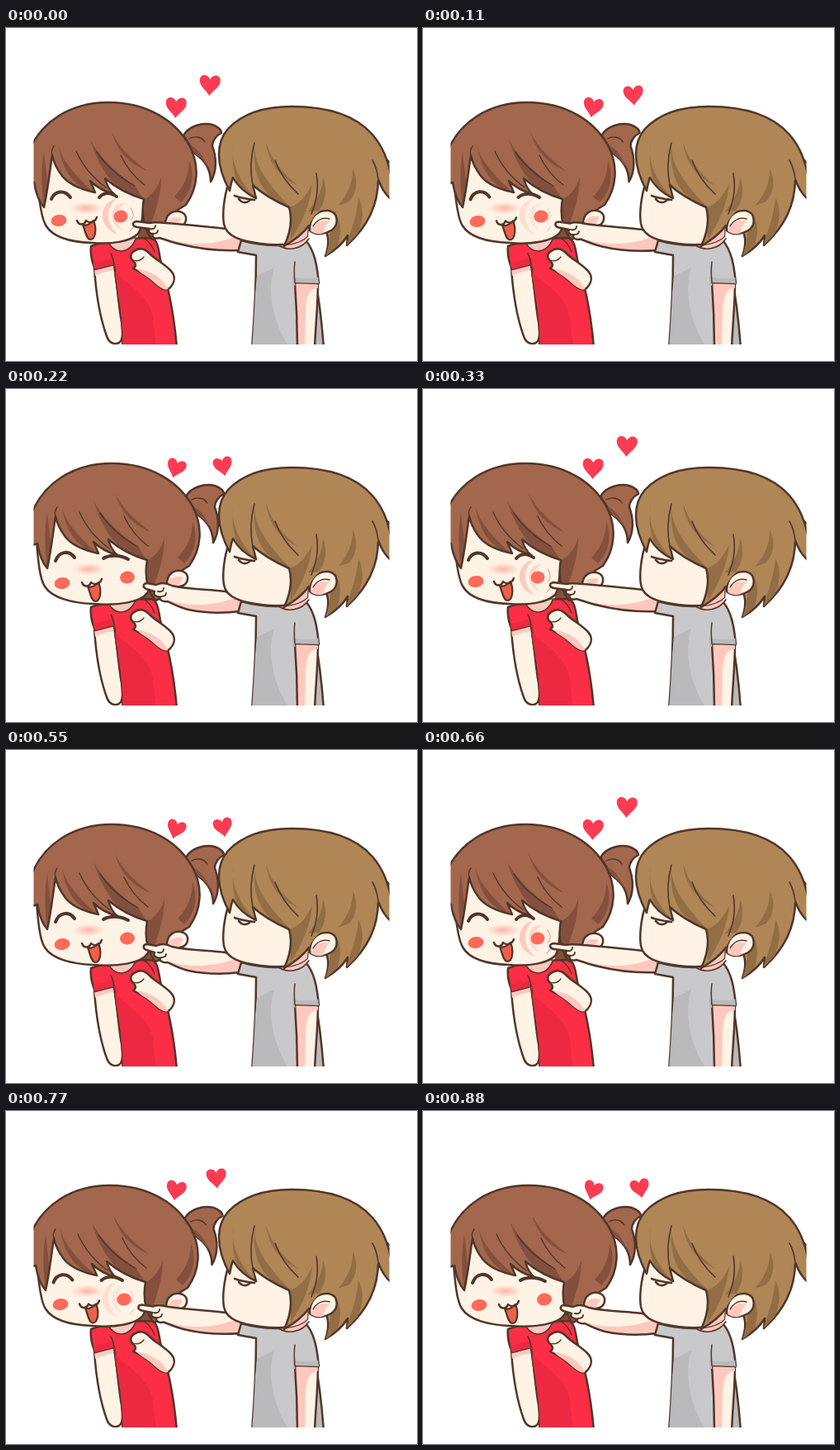
These frames come from a looping animation (498x403 px, 990 ms). An HTML page with a canvas:

```html
<!DOCTYPE html>
<html lang="en">
<head>
<meta charset="utf-8">
<title>Cheek poke</title>
<style>
html, body { margin: 0; width: 100%; height: 100%; overflow: hidden; background: #fff; }
canvas { display: block; width: 498px; height: 403px; }
</style>
</head>
<body>
<canvas id="stage" width="498" height="403"></canvas>
<script>
const ctx = document.getElementById('stage').getContext('2d');
const STEP = 110, CYCLE = 3;
const C = {
  line: '#513629', skin: '#fff3e5', pink: '#ffc8bf', cheek: '#ff6a5c', heart: '#fb3c53',
  girl: '#a2674d', girlDark: '#84503d', boy: '#b08657', boyDark: '#926d45',
  red: '#fc2e45', redDark: '#ec2940', grey: '#c9c8ca', greyDark: '#bab9bc'
};

// Blend two paths that share the same commands.
function mix(a, b, p) {
  const to = b.match(/-?[\d.]+/g);
  let i = 0;
  return a.replace(/-?[\d.]+/g, n => +n + (to[i++] - n) * p);
}
const lerp = (a, b, p) => a + (b - a) * p;

function shape(d, fill, stroke, width = 2.5) {
  const path = new Path2D(d);
  if (fill) { ctx.fillStyle = fill; ctx.fill(path); }
  if (stroke) { ctx.strokeStyle = stroke; ctx.lineWidth = width; ctx.stroke(path); }
}

function inside(d, draw) {
  ctx.save();
  ctx.clip(new Path2D(d));
  draw();
  ctx.restore();
}

function oval(x, y, rx, ry, fill, turn = 0) {
  ctx.beginPath();
  ctx.ellipse(x, y, rx, ry, turn, 0, 7);
  ctx.fillStyle = fill;
  ctx.fill();
}

function shifted(x, y, draw) {
  ctx.save();
  ctx.translate(x, y);
  draw();
  ctx.restore();
}

function heart(x, y, size, turn) {
  ctx.save();
  ctx.translate(x, y);
  ctx.rotate(turn);
  ctx.scale(size / 24, size / 24);
  shape('M0 13C-4 6 -12 3 -12 -5C-12 -12 -3 -13 0 -6C3 -13 12 -12 12 -5C12 3 4 6 0 13Z', C.heart);
  ctx.restore();
}

function ponytail(p) {
  shifted(3 * p, 0, () => {
    const d = 'M215 130C221 119 237 114 250 117C256 119 261 123 261 127C255 130 250 136 250 143C255 156 256 173 248 186C248 173 242 161 229 152Z';
    shape(d, C.girl, C.line);
    inside(d, () => shape('M216 140C232 142 244 157 248 186L240 180L226 156Z', C.girlDark));
    shape('M222 134C230 130 237 132 241 138', null, C.line, 1.3);
  });
}

function girlBody() {
  shape('M160 235L190 236C183 250 181 256 178 263L160 264Z', C.girlDark);
  const arm = 'M107 290C109 322 113 348 122 373C125 382 134 385 139 379C143 372 141 360 139 350C136 330 134 306 131 285Z';
  shape(arm, C.skin, C.line);
  inside(arm, () => shape('M106 291L132 285L133 293C124 293 114 297 108 300Z', C.pink));
  const shirt = 'M103 264C124 256 156 254 177 254C184 257 185 269 187 280C195 309 203 339 207 387L141 387C143 352 135 323 131 286L108 292C104 283 102 273 103 264Z';
  shape(shirt, C.red, C.line);
  inside(shirt, () => {
    shape('M130 292C145 310 172 320 178 350L182 387L140 387Z', C.redDark);
    shape('M106 284L132 278L132 289L106 296Z', C.redDark);
    shape('M122 254C126 266 133 270 140 270C149 269 155 262 158 253Z', C.pink, C.line, 1.6);
  });
  shape('M131 286C130 280 129 276 127 273', null, C.line, 1.6);
  shape('M166 254C172 257 177 263 180 271', null, C.line, 1.4);
  const hand = 'M154 291C159 288 157 284 153 281C149 276 152 271 157 269C163 265 169 268 174 273C181 280 191 285 199 293C206 300 205 308 198 315C192 320 183 311 176 305C169 299 160 294 154 291Z';
  shape(hand, C.skin, C.line);
  inside(hand, () => shape('M158 291C177 294 191 304 197 317L188 319L168 301Z', C.pink));
  shape('M154 281C160 283 164 281 167 277', null, C.line, 1.3);
}

function girlHead(p) {
  const face = mix(
    'M38 184C40 209 43 232 49 240C57 253 78 259 104 260C130 262 151 258 160 249C165 243 165 227 168 200L110 145L50 155Z',
    'M37 184C39 209 41 230 47 239C56 253 80 259 105 260C138 263 164 257 171 247C177 239 175 222 174 200L114 145L54 155Z', p);
  shape(face, C.skin, C.line);

  const g = ctx.createRadialGradient(0, 0, 0, 0, 0, 20);
  g.addColorStop(0, 'rgba(255,142,132,.65)');
  g.addColorStop(1, 'rgba(255,160,145,0)');
  ctx.save();
  ctx.translate(lerp(97, 100, p), 218);
  ctx.scale(1, .38);
  oval(0, 0, 20, 20, g);
  ctx.restore();

  // Dent under the fingertip.
  ctx.globalAlpha = 1 - p;
  shape('M133 207C112 211 110 242 136 250C121 238 120 220 133 207Z', '#ffcabf');
  shape('M144 212C124 211 123 239 142 245C131 236 131 220 144 212Z', '#ffd8cd');
  shape('M151 218C156 225 154 231 151 233M155 240L150 246', null, '#eab0a3', 1.3);
  ctx.globalAlpha = 1;

  oval(lerp(64, 68, p), lerp(233, 235, p), 9.5, 7, C.cheek, -.12);
  oval(lerp(139, 147, p), 228, lerp(8.5, 9, p), 7.5, C.cheek, -.12);

  shape(mix('M55 207C59 197 71 195 78 205', 'M60 208C64 197 76 194 83 204', p), null, C.line, 4);
  shape(mix('M113 205C118 199 126 198 134 204', 'M118 205C124 201 137 200 148 206', p), null, C.line, 4);

  shifted(6 * p, p, () => {
    shape('M93 238C97 240 102 237 106 233C110 242 109 256 102 256C97 255 96 245 93 238Z', '#ef604b', C.line, 2.2);
    shape('M86 233C88 239 95 239 97 233C101 237 108 235 110 229', null, C.line, 2.4);
  });

  shifted(4 * p, 0, () => {
    const hair = 'M25 190L25 156C40 112 80 90 124 90C172 90 206 113 222 142C235 166 233 193 218 214C207 220 199 226 194 236C190 247 185 254 177 256C169 246 163 230 167 207C150 202 134 194 120 182C122 190 126 197 131 201C117 197 108 191 102 185L108 199C89 195 75 188 68 179C62 171 58 164 56 154C53 173 51 194 46 217C39 209 36 199 34 187Z';
    shape(hair, C.girl);
    inside(hair, () => {
      shape('M63 138C65 158 84 179 109 201C86 193 68 178 63 138Z', C.girlDark);
      shape('M102 135C114 157 132 174 157 192L167 208C140 203 116 181 102 135Z', C.girlDark);
      shape('M128 126C139 147 151 157 171 173C151 165 135 150 128 126Z', C.girlDark);
      shape('M165 208C176 204 184 194 188 180C188 203 181 223 172 248L163 230Z', C.girlDark);
      shape('M204 204C216 192 222 177 222 160C229 178 226 197 212 211Z', C.girlDark);
      shape('M46 150C42 171 43 196 46 219L51 193Z', C.girlDark);
    });
    shape(hair, null, C.line);
    shape('M85 149C94 169 106 182 121 193M110 150C122 168 138 181 156 191M139 154C147 171 156 181 168 190M58 143C55 147 55 151 56 154', null, C.line, 1.4);
  });

  shifted(2 * p, -2 * p, () => {
    const ear = 'M193 238C193 225 203 219 213 223C221 227 219 237 212 240C205 243 198 242 193 238Z';
    shape(ear, C.skin, C.line);
    inside(ear, () => shape('M194 240C195 230 203 227 213 230L206 242Z', C.pink));
  });
}

function boyBody() {
  shape('M374 300C380 330 383 360 385 388L350 388L350 305Z', C.greyDark, C.line);
  const arm = 'M350 307L378 308C378 335 375 360 374 388L352 388C352 361 351 335 350 307Z';
  shape(arm, C.skin, C.line);
  inside(arm, () => shape('M348 305L381 305L380 315C368 314 364 322 363 345L362 390L350 390Z', C.pink));
  const shirt = 'M285 257C310 264 342 266 363 257C374 269 377 288 379 309L350 308C352 335 353 360 353 388L298 388C301 350 303 311 303 275L281 271Z';
  shape(shirt, C.grey, C.line);
  inside(shirt, () => {
    shape('M325 290C315 320 325 362 346 390L295 390L304 300Z', C.greyDark);
    shape('M347 301C360 304 370 304 381 301L381 313L347 312Z', C.greyDark);
  });
  shape('M350 308C349 297 349 290 350 283', null, C.line, 1.5);
  shape('M329 262C341 271 358 268 367 255', C.pink, C.line, 1.6);
}

function pokingArm(p) {
  const arm = mix(
    'M284 269C260 270 233 267 213 262C203 260 193 256 186 254C179 256 176 252 178 249C173 249 172 246 174 243L159 241C153 240 152 235 158 234L174 236C181 234 187 236 193 236C222 238 249 241 267 243C274 249 281 252 287 256Z',
    'M284 269C261 272 240 271 221 267C209 264 202 260 196 257C190 258 185 255 187 252C180 251 178 248 180 245L170 242C165 240 166 235 171 235L182 237C188 234 195 235 201 238C222 243 247 242 266 245C273 249 281 252 287 256Z', p);
  shape(arm, C.skin);
  inside(arm, () => shape('M198 256C222 264 252 262 274 254L290 254L286 274L215 271Z', C.pink));
  shape(arm, null, C.line);
  shifted(10 * p, 2 * p, () => shape('M174 243C179 244 181 242 181 239M178 249C182 249 184 247 184 245', null, C.line, 1.8));
}

function boyHead() {
  const back = 'M344 200C354 118 414 111 450 151L475 170L475 214C460 204 455 194 451 183C451 211 440 239 413 263L414 251C408 261 399 269 387 276C393 259 390 248 384 238Z';
  shape(back, C.boy, C.line);
  inside(back, () => {
    shape('M397 222C392 239 395 258 386 278L402 263C407 246 406 232 397 222Z', C.boyDark);
    shape('M427 205C425 228 418 245 412 264L426 249C433 234 434 218 427 205Z', C.boyDark);
  });
  const face = 'M270 187C264 204 262 225 264 237C267 253 286 258 309 261C333 264 353 263 365 252L369 190L300 150Z';
  shape(face, C.skin, C.line);
  inside(face, () => shape('M345 218L372 216L366 263L330 267C348 258 354 241 345 218Z', C.pink));
  const ear = 'M368 245C368 229 377 220 391 221C404 224 403 239 394 245C385 250 375 251 368 245Z';
  shape(ear, C.skin, C.line);
  inside(ear, () => shape('M368 250C371 235 382 231 392 234C387 238 386 243 384 250Z', C.pink));
  shape('M372 240C377 231 385 229 392 231', null, C.line, 1.4);

  shape('M277 203C285 206 293 207 301 208M282 207C286 212 291 212 295 209', null, C.line, 2.7);

  const hair = 'M271 197C254 166 254 139 269 122C287 103 315 95 346 95C391 95 424 106 444 129C457 144 462 159 466 176L451 183C437 203 408 216 382 220C374 226 370 232 367 239C360 249 349 257 337 264C345 247 347 231 343 217C327 210 311 201 299 190L303 206C290 200 281 192 275 181C273 186 272 192 271 197Z';
  shape(hair, C.boy);
  inside(hair, () => {
    shape('M276 140C271 162 284 187 303 207C282 197 271 179 276 140Z', C.boyDark);
    shape('M301 140C300 166 318 190 346 218C318 208 297 188 301 140Z', C.boyDark);
    shape('M315 138C322 161 336 176 354 191C333 181 318 165 315 138Z', C.boyDark);
    shape('M344 217C354 214 364 204 371 188C369 213 358 237 345 256Z', C.boyDark);
    shape('M384 180C384 195 377 209 366 222L379 221C387 211 390 196 384 180Z', C.boyDark);
    shape('M420 170C421 186 414 202 402 215L415 211C426 199 427 184 420 170Z', C.boyDark);
  });
  shape('M299 190C295 171 297 154 301 139M326 160C332 177 342 190 354 201M370 225C377 207 379 194 376 176M451 183C450 174 448 167 444 160', null, C.line, 1.6);
  shape('M367 239C360 249 349 257 337 264C345 247 347 231 343 217C327 210 311 201 299 190L303 206C290 200 281 192 275 181C273 186 272 192 271 197C254 166 254 139 269 122C287 103 315 95 346 95C391 95 424 106 444 129C457 144 462 159 466 176', null, C.line);
}

// p: 0 = finger pressed in, 1 = finger pulled back.
function draw(p) {
  ctx.fillStyle = '#fff';
  ctx.fillRect(0, 0, 498, 403);
  ctx.save();
  ctx.beginPath();
  ctx.rect(33.5, 50, 431, 333);
  ctx.clip();
  ctx.lineJoin = ctx.lineCap = 'round';
  heart(206, 95.5, lerp(25, 23, p), lerp(.05, .3, p));
  heart(lerp(247, 263, p), lerp(68.5, 93, p), lerp(25, 23, p), lerp(.05, -.2, p));
  ponytail(p);
  girlBody();
  girlHead(p);
  pokingArm(p);
  boyBody();
  boyHead();
  ctx.restore();
}

let shown = -1;
function tick() {
  const pose = Math.floor(performance.now() / STEP) % CYCLE;
  if (pose !== shown) draw((shown = pose) / (CYCLE - 1));
  requestAnimationFrame(tick);
}
tick();
</script>
</body>
</html>
```
